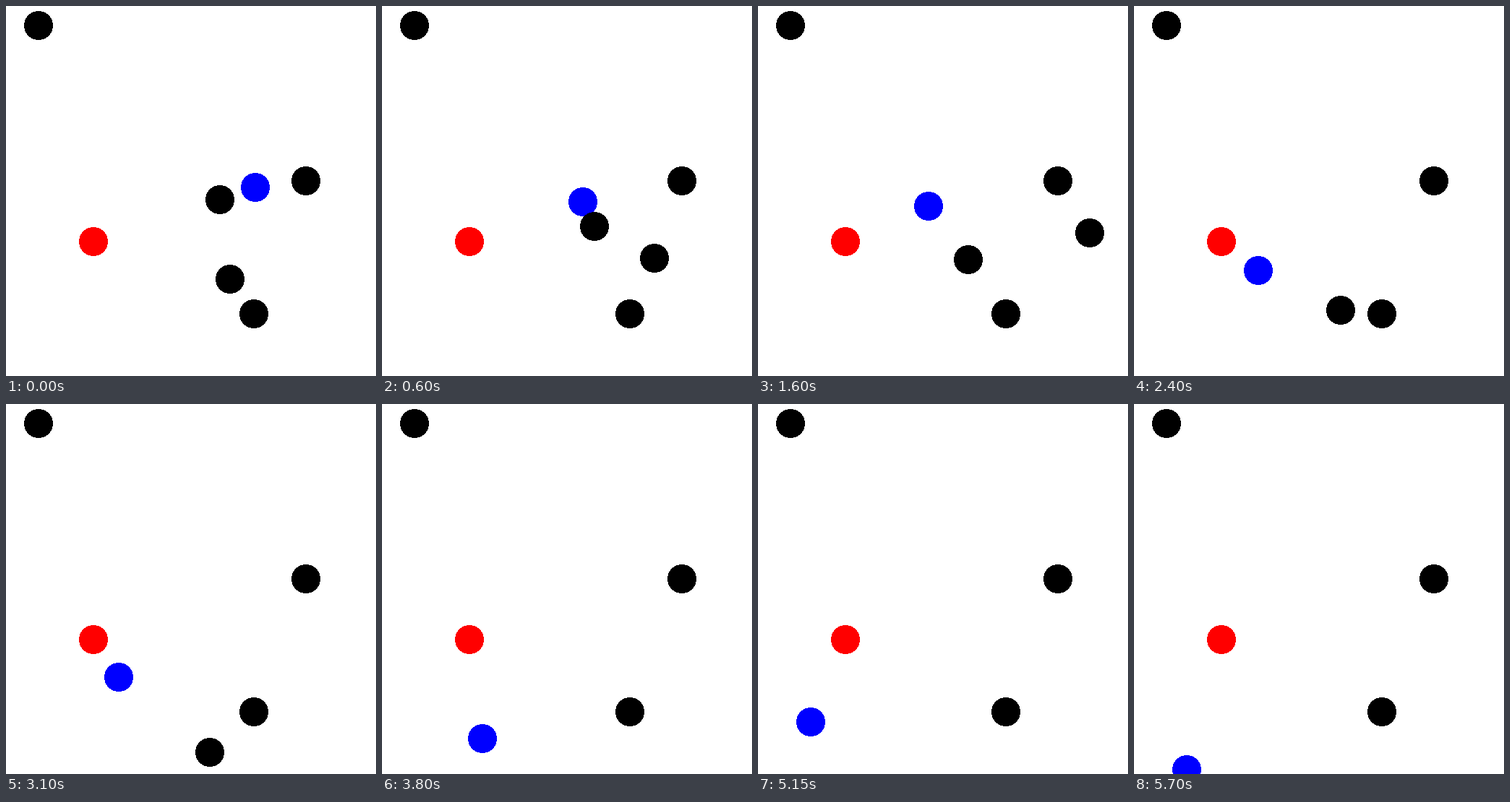
These frames come from a looping animation (512x512 px, 5750 ms). An HTML page with a canvas:

```html
<!DOCTYPE html>
<html>
<head>
<meta charset="utf-8">
<style>
html, body { margin: 0; width: 100%; height: 100%; overflow: hidden; background: #fff; }
canvas { display: block; }
</style>
</head>
<body>
<canvas id="stage" width="512" height="512"></canvas>
<script>
const ctx = document.getElementById('stage').getContext('2d');
const STEP = 50, STEPS = 115, RESET = 13, RADIUS = 20;

// Turning points of the agent in each run: [step, x, y]
const firstRun = [[0, 345, 251], [6, 314, 229], [12, 278, 271]];
const secondRun = [
  [0, 345, 251], [11, 238, 233], [19, 236, 277], [23, 183, 305],
  [35, 172, 366], [49, 156, 378], [63, 139, 463], [71, 113, 401],
  [78, 152, 403], [90, 73, 440], [95, 101, 418], [101, 73, 506]
];

// Smooth curve through unevenly timed points
function along(path, n) {
  const i = Math.max(0, path.findIndex(p => p[0] >= n) - 1);
  const a = path[i], b = path[i + 1];
  const before = path[i - 1] || a, after = path[i + 2] || b;
  const span = b[0] - a[0], u = (n - a[0]) / span;
  const slope = (p, q, k) => (q[k] - p[k]) / (q[0] - p[0]) * span;
  return [1, 2].map(k => {
    const m0 = slope(before, b, k), m1 = slope(a, after, k), d = b[k] - a[k];
    return a[k] + u * (m0 + u * (3 * d - 2 * m0 - m1 + u * (m0 + m1 - 2 * d)));
  });
}

// Hard-edged disc, filled row by row
function disc(color, x, y) {
  ctx.fillStyle = color;
  x = Math.round(x);
  y = Math.round(y);
  for (let row = -RADIUS; row < RADIUS; row++) {
    const half = Math.round(Math.sqrt(RADIUS ** 2 - (row + 0.5) ** 2));
    ctx.fillRect(x - half, y + row, 2 * half, 1);
  }
}

function draw(step) {
  ctx.fillStyle = '#fff';
  ctx.fillRect(0, 0, 512, 512);
  const early = step < RESET;
  const n = early ? step : step - RESET;
  const drift = early ? n * 0.71 : n;
  disc('#f00', 121, 326);
  disc('#00f', ...along(early ? firstRun : secondRun, n));
  disc('#000', 45, 27);
  disc('#000', 415, 242);
  disc('#000', 343, 426);
  disc('#000', 296 - 0.286 * drift, 268 + 4.375 * drift);
  disc('#000', 310 + 7.85 * drift, 378 - 3.37 * drift);
}

const start = performance.now();
function tick() {
  draw(Math.floor((performance.now() - start) / STEP) % STEPS);
  requestAnimationFrame(tick);
}
tick();
</script>
</body>
</html>
```
